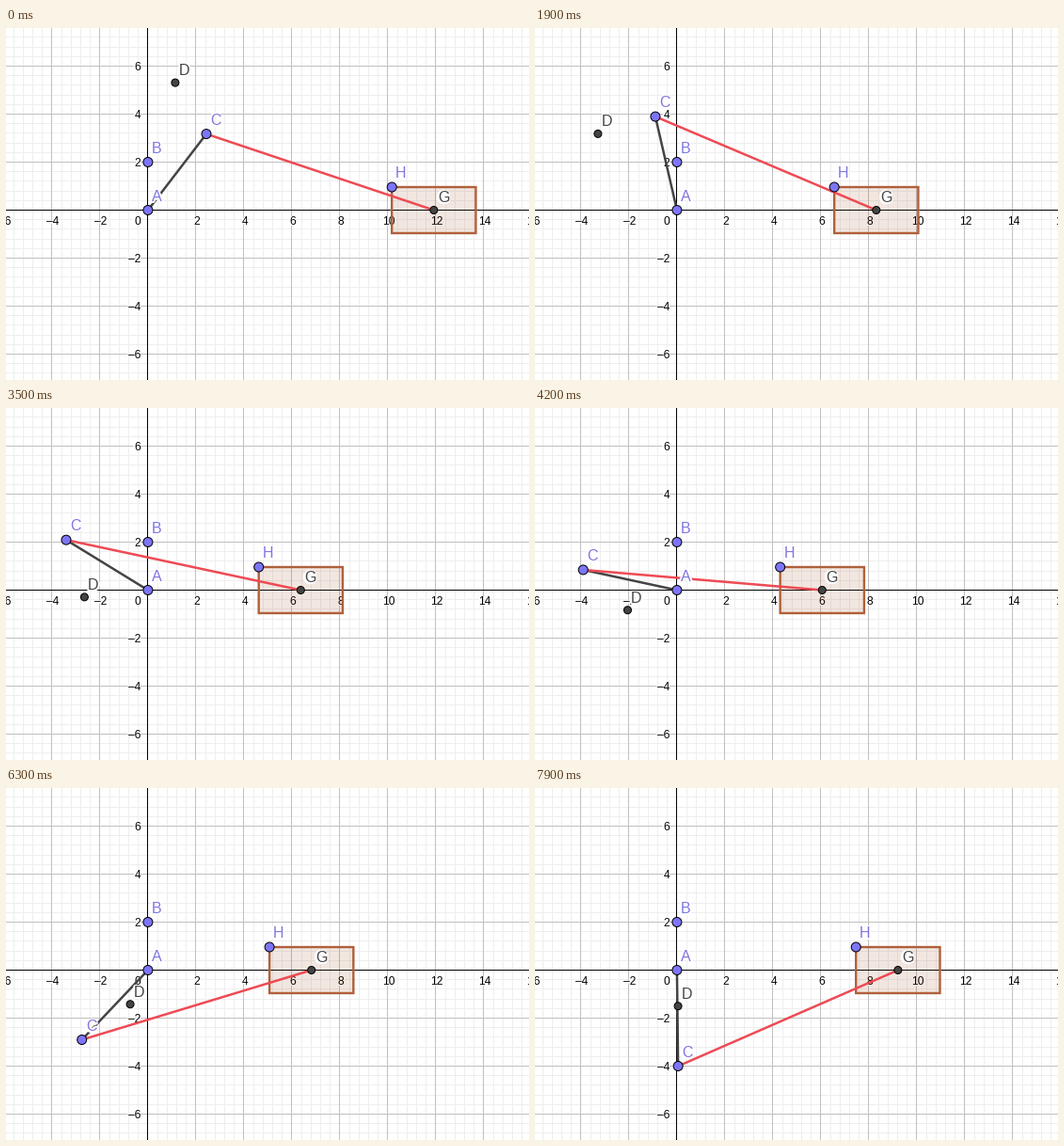
A matplotlib script for the animation above (8 s loop, 556 by 374 pixels).

```python
import numpy as np
import matplotlib.pyplot as plt
from matplotlib.animation import FuncAnimation
from matplotlib.patches import Circle, Rectangle
from matplotlib.patheffects import Stroke

W, H, DPI = 556, 374, 64
PX = 72 / DPI                      # one pixel in points
FRAMES, STEP = 80, 100
ORIGIN = np.array([150.9, 193.5])
UNIT = 25.5

CRANK, COUPLER, ROCKER, ROD = 4, 2.5, 3.5, 10
A, B = np.array([0.0, 0.0]), np.array([0.0, 2.0])
BOX_W, BOX_H = 3.5, 1.92

BLUE, BLUE_TEXT = "#7d75f7", "#8076e0"
DARK, RED, BROWN = "#444444", "#ee4a54", "#b0603a"

plt.rcParams["font.family"] = "Liberation Sans"
fig = plt.figure(figsize=(W / DPI, H / DPI), dpi=DPI, facecolor="white")
ax = fig.add_axes([0, 0, 1, 1])
ax.set_xlim(0, W)
ax.set_ylim(H, 0)
ax.axis("off")


def to_px(p):
    return ORIGIN + UNIT * np.array([p[0], -p[1]])


class Label:
    """Text with a white halo, kept on whole pixels."""

    def __init__(self, s, size, color, halo, z, ha="left"):
        style = dict(fontsize=size * PX, ha=ha, va="baseline")
        edge = [Stroke(linewidth=halo * PX, foreground="white")]
        self.parts = [ax.text(0, 0, s, color="white", zorder=z, path_effects=edge, **style),
                      ax.text(0, 0, s, color=color, zorder=z + 0.1, **style)]

    def move(self, x, y):
        for part in self.parts:
            part.set_position((round(x), round(y)))


def grid_line(k, step, color, z):
    # Whole coordinates snap to the pixel that starts there.
    x, y = np.floor(ORIGIN + k * step)
    ax.plot([x, x], [0, H], color=color, lw=PX, zorder=z)
    ax.plot([0, W], [y, y], color=color, lw=PX, zorder=z)


def draw_grid():
    for k in range(-20, 42):
        if k % 5:
            grid_line(k, 0.4 * UNIT, "#eeeeee", 1)
    for k in range(-4, 9):
        grid_line(k, 2 * UNIT, "#c0c0c0", 2)
    grid_line(0, UNIT, "black", 3)


def number(x, y, n, ha):
    Label(str(n).replace("-", "\u2013"), 12, "black", 2.5, 4, ha).move(x, y)


def draw_numbers():
    number(143, 209, 0, "right")
    for n in range(-6, 17, 2):
        x, y = to_px((n, n))
        if n:
            number(x + 0.7, 209, n, "center")
        if n and abs(n) <= 6:
            number(143, y + 4.4, n, "right")


class Point:
    def __init__(self, name, free=True):
        self.lift = 9.7 if free else 8.2
        self.dot = ax.add_patch(Circle((0, 0), 5 if free else 4, fc=BLUE if free else DARK,
                                       ec="black", lw=PX, zorder=8))
        self.label = Label(name, 16, BLUE_TEXT if free else DARK, 4, 9)

    def move(self, p):
        x, y = to_px(p)
        self.dot.center = x, y
        self.label.move(x + 4, y - self.lift)


def crank_angle(t):
    """Crank angle in radians; the pace wavers slightly around 28 degrees a second."""
    times = [0, 1.9, 2.9, 4.2, 5.2, 6.3, 7.9]
    degrees = [52.5, 103, 131.9, 167.8, 197.7, 226.5, 270.7]
    return np.radians(np.interp(t, times, degrees))


def rocker_end(c):
    """Joint at COUPLER from c and ROCKER from B."""
    d = c - B
    r = np.hypot(*d)
    cos = (ROCKER**2 - COUPLER**2 + r**2) / (2 * ROCKER * r)
    a = np.arctan2(d[1], d[0]) + np.arccos(np.clip(cos, -1, 1))
    return B + ROCKER * np.array([np.cos(a), np.sin(a)])


def set_segment(line, p, q):
    line.set_data(*np.transpose([to_px(p), to_px(q)]))


draw_grid()
draw_numbers()
box = ax.add_patch(Rectangle((0, 0), BOX_W * UNIT, BOX_H * UNIT, fc=(0.6, 0.2, 0, 0.12),
                             ec=BROWN, lw=2.4 * PX, zorder=5, snap=False))
crank, = ax.plot([], [], color=DARK, lw=2.5 * PX, zorder=6)
rod, = ax.plot([], [], color=RED, lw=2.5 * PX, zorder=6)
points = {n: Point(n, n not in "DG") for n in "ABCDGH"}


def update(i):
    a = crank_angle(i * STEP / 1000)
    c = CRANK * np.array([np.cos(a), np.sin(a)])
    g = np.array([c[0] + np.sqrt(ROD**2 - c[1]**2), 0])
    h = g + [-BOX_W / 2, BOX_H / 2]
    set_segment(crank, A, c)
    set_segment(rod, c, g)
    box.set_xy(to_px(h))
    places = dict(A=A, B=B, C=c, D=rocker_end(c), G=g, H=h)
    for name, p in places.items():
        points[name].move(p)
    return []


anim = FuncAnimation(fig, update, frames=FRAMES, interval=STEP,
                     repeat=True, repeat_delay=0, blit=False)
plt.show()
```
